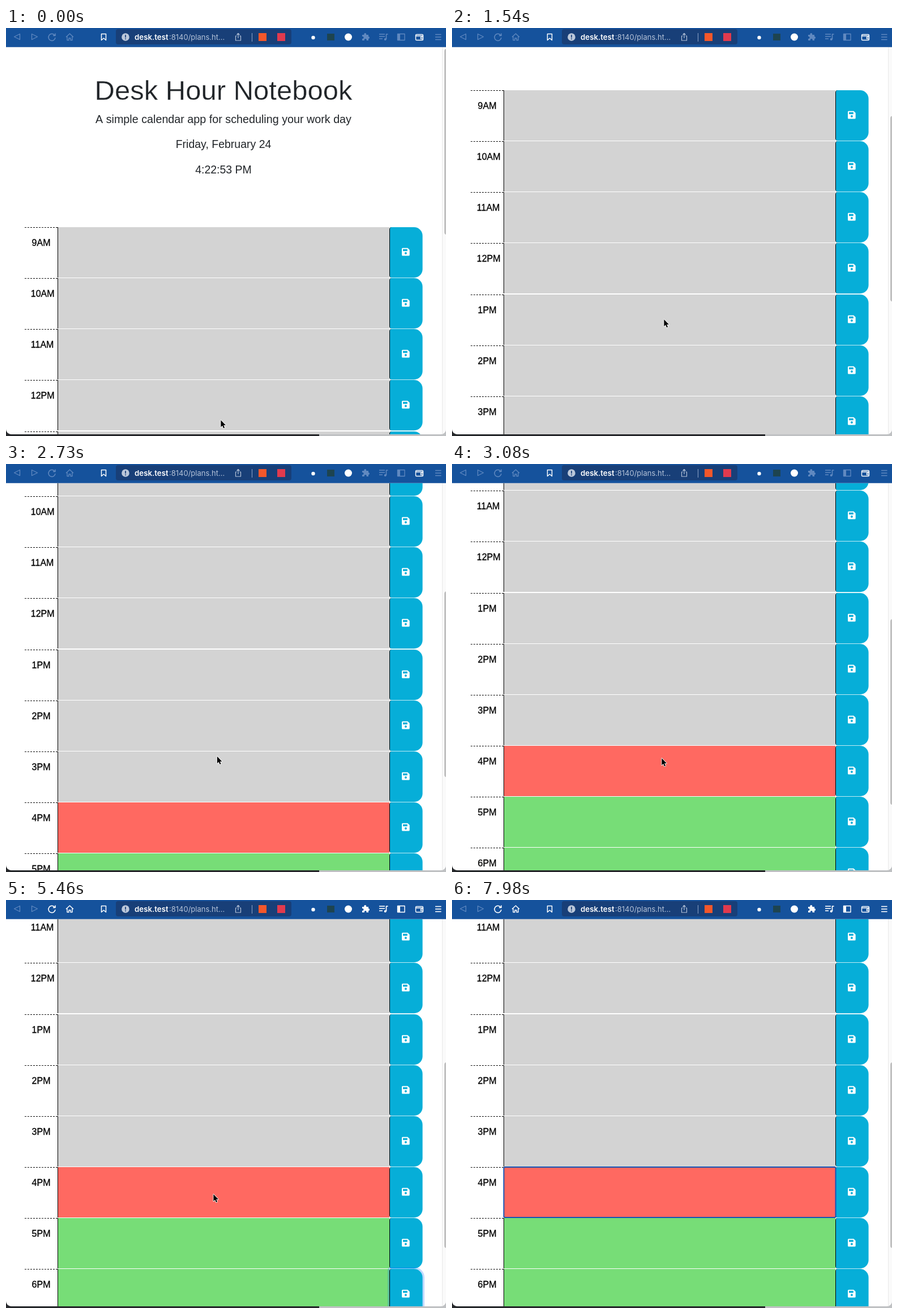
Write an HTML page with a canvas that moves like this. It is 777 px wide and 721 px high and loops after 8000 ms.

```html
<!DOCTYPE html>
<html lang="en">
<head>
<meta charset="utf-8">
<title>Desk Hour Notebook</title>
<style>
html, body { margin: 0; width: 100%; height: 100%; overflow: hidden; background: #fff; }
canvas { display: block; }
</style>
</head>
<body>
<canvas id="stage" width="777" height="721"></canvas>
<script>
const g = document.getElementById('stage').getContext('2d');
const LOOP = 8000, STEP = 70, PITCH = 90.15;
const SANS = '"Liberation Sans", Arial, sans-serif';
const UI = 'Inter, Roboto, sans-serif';
const BLUE = '#06aed8', FIELD = '#183f78';

const linear = p => p;
const easeIn = k => p => p ** k;
const easeOut = k => p => 1 - (1 - p) ** k;
const smooth = p => p * p * (3 - 2 * p);

// Trackpad flicks: the last one coasts to a stop.
const FLICKS = [
  { from: 630, to: 1050, y: 234, ease: easeIn(1.92) },
  { from: 1470, to: 1680, y: 65, ease: easeIn(1.92) },
  { from: 1750, to: 2030, y: 46, ease: easeOut(1.18) },
  { from: 2450, to: 2520, y: 4, ease: linear },
  { from: 2660, to: 3850, y: 162, ease: easeOut(4.2) }
];
const NUDGES = [
  { from: 0, to: 630, x: -5, y: -179, ease: smooth },
  { from: 1190, to: 1260, x: 0, y: 1, ease: linear },
  { from: 2170, to: 2310, x: -1, y: 1, ease: linear },
  { from: 2660, to: 3080, x: -3, y: 4, ease: linear },
  { from: 3080, to: 3360, x: -4, y: 0, ease: linear }
];

const ramp = (t, from, to) => Math.max(0, Math.min(1, (t - from) / (to - from)));
const travel = (moves, t, axis) =>
  moves.reduce((sum, m) => sum + m[axis] * m.ease(ramp(t, m.from, m.to)), 0);

function rect(x, y, w, h, color) {
  g.fillStyle = color;
  g.fillRect(x, y, w, h);
}

function round(x, y, w, h, r, color) {
  g.fillStyle = color;
  g.beginPath();
  g.roundRect(x, y, w, h, r);
  g.fill();
}

function dot(x, y, r, color) {
  g.fillStyle = color;
  g.beginPath();
  g.arc(x, y, r, 0, 7);
  g.fill();
}

function line(d, color, width = 1.3) {
  g.strokeStyle = color;
  g.lineWidth = width;
  g.stroke(new Path2D(d));
}

function shape(d, color) {
  g.fillStyle = color;
  g.fill(new Path2D(d));
}

function text(s, x, y, font, color, align = 'left') {
  g.font = font;
  g.textAlign = align;
  g.fillStyle = color;
  g.fillText(s, x, y);
}

// Changes the weight of the text just drawn: a white edge thins it.
function edge(s, x, y, color, width) {
  g.strokeStyle = color;
  g.lineWidth = width;
  g.strokeText(s, x, y);
}

function heading(s, y, size) {
  text(s, 384, y, `${size}px ${SANS}`, '#212529', 'center');
}

function saveIcon(x, y) {
  shape(`M${x + 1.5} ${y}h8.8l3.4 3.4v8.8a1.5 1.5 0 0 1-1.5 1.5h-10.7a1.5 1.5 0 0 1-1.5-1.5v-10.7a1.5 1.5 0 0 1 1.5-1.5z`, '#fff');
  rect(x + 2, y + 2, 7.8, 3.5, BLUE);
  dot(x + 6.9, y + 9.3, 2, BLUE);
}

function row(hour, y, glow, focus, caret) {
  const label = (hour > 12 ? hour - 12 : hour) + (hour < 12 ? 'AM' : 'PM');
  g.setLineDash([3, 2]);
  line(`M33 ${y + .5}H91`, '#000', 1);
  g.setLineDash([]);

  const x = label.length > 3 ? 43.8 : 45.6;
  text(label, x, y + 33, `16px ${SANS}`, '#000');
  edge(label, x, y + 33, '#000', .3);

  rect(91, y, 1, 89, '#000');
  rect(92, y, 585, 89, hour < 16 ? '#d3d3d3' : hour > 16 ? '#77dd77' : '#ff6961');

  if (glow) round(674, y - 3, 65, 95, [5, 18, 18, 5], `rgba(13,110,253,${.25 * glow})`);
  round(677, y, 20, 89, 4, '#000');
  round(678, y, 57.6, 89.2, [3, 15, 15, 3], BLUE);
  saveIcon(699, y + 36.7);

  if (focus) {
    g.globalAlpha = focus;
    g.strokeStyle = '#1453b5';
    g.lineWidth = 2;
    g.beginPath();
    g.roundRect(91.5, y, 586, 89, 2);
    g.stroke();
    g.globalAlpha = 1;
  }
  if (caret) rect(104, y + 13, 1, 17, '#000');
}

function page(t) {
  const scroll = Math.round(travel(FLICKS, t, 'y'));
  const focus = ramp(t, 6930, 7140);
  const glow = ramp(t, 3990, 4200) * (1 - focus);

  rect(0, 700, 777, 21, '#26282b');
  rect(553, 700, 224, 21, '#bfc1c3');
  g.save();
  g.beginPath();
  g.roundRect(0, 0, 777, 718, [0, 0, 9, 9]);
  g.clip();
  rect(0, 0, 777, 721, '#fff');

  const title = 'Desk Hour Notebook';
  heading(title, 127 - scroll, 49);
  edge(title, 384, 127 - scroll, '#fff', .35);
  heading('A simple calendar app for scheduling your work day', 168 - scroll, 19.74);
  heading('Friday, February 24', 212 - scroll, 19.5);
  heading(`4:22:${53 + Math.floor((t + 500) / 1000)} PM`, 257 - scroll, 19.5);

  for (let hour = 9; hour < 19; hour++) {
    const y = Math.round(352 - scroll + (hour - 9) * PITCH);
    const now = hour === 16;
    row(hour, y, hour === 18 && glow, now && focus, now && t >= 7000 && t < 7560);
  }

  rect(770, 34, 7, 687, '#fafafa');
  rect(770, 34, 1, 687, '#e8e8e8');
  round(774, 37 + scroll * .489, 8, 328, 4, '#c1c1c1');
  g.restore();
}

// Icons that dim while the window is inactive.
function controls(color) {
  line('M86 13A6 6 0 1 0 87 17M87 9.5V13.5H83', color, 1.5);
  line('M106 16L112.5 10L119 16M108 15V21.5H111V18H114V21.5H117V15', color);
  shape('M629 12H632.5A2 2 0 1 1 636 12H640V15A2 2 0 1 1 640 19V22H636.5A2 2 0 1 0 633 22H629V18.8A2 2 0 1 0 629 15Z', color);
  line('M659 11H669M659 15H669M659 19H665M671.5 20V11H674.5', color, 1.6);
  dot(669.7, 20, 2, color);
  line('M691.5 10.5H704V21.5H691.5Z', color);
  rect(692, 11, 4, 10, color);
  line('M758 11.5H768.5M758 16H768.5M758 20.5H768.5', color, 1.5);
}

function toolbar(t) {
  const dim = '#6089c0', soft = '#b5c3d9';
  rect(0, 0, 777, 33, '#15529c');
  rect(0, 33, 777, 1, '#4a78b2');
  round(194, 2, 310, 27, 4, FIELD);

  line('M24.5 10.5L14.5 15.5L24.5 20.5Z', dim);
  line('M45.5 10.5L55.5 15.5L45.5 20.5Z', dim);
  line('M168.5 10.5H176.5V21.5L172.5 18L168.5 21.5Z', '#fff', 1.5);

  dot(211, 16, 6.8, '#bcc8da');
  rect(210.2, 12, 1.7, 5, FIELD);
  rect(210.2, 18.3, 1.7, 1.8, FIELD);
  text('desk.test', 227, 20.5, `600 13.3px ${UI}`, '#fff');
  text(':8140/plans.ht...', 288, 20.5, `13px ${UI}`, soft);
  line('M407.5 14H405.5V22H414.5V14H412.5M410 18V9.5M407.5 12L410 9.5L412.5 12', soft, 1.2);
  rect(434, 9, 1, 15, '#8ea5c8');

  rect(446, 9, 14, 14, '#f4572b');
  rect(479, 9, 14, 14, '#e23a4e');
  dot(542.5, 17, 3.2, '#fff');
  rect(567, 10, 13, 12, '#1d4450');
  dot(604.5, 16, 6.5, '#fff');
  line('M725 11.5H735Q736.5 11.5 736.5 13V20Q736.5 21.5 735 21.5H725Q723.5 21.5 723.5 20V13Q723.5 11.5 725 11.5M724 14H736M737 16H732.5V19H737', '#fff', 1.4);

  controls(dim);
  g.globalAlpha = ramp(t, 3990, 4200);
  controls('#fff');
  g.globalAlpha = 1;
}

function pointer(t) {
  if (t >= 7980) return;
  g.save();
  g.translate(379 + travel(NUDGES, t, 'x'), 692 + travel(NUDGES, t, 'y'));
  if (t < 7000) {
    const arrow = 'M.4 1V13.3L3.2 10.8L5.1 15.2L7.1 14.3L5.2 10H9Z';
    line(arrow, '#fff', 1.6);
    shape(arrow, '#000');
  } else {
    const beam = 'M-3 -7Q.5 -7 .5 -4.5Q.5 -7 4 -7M-3 10Q.5 10 .5 7.5Q.5 10 4 10M.5 -5V8M-1.5 3.5H2.5';
    line(beam, '#fff', 3);
    line(beam, '#000', 1.1);
  }
  g.restore();
}

g.lineJoin = 'round';

function draw(now) {
  const t = Math.floor(now % LOOP / STEP) * STEP;
  page(t);
  toolbar(t);
  pointer(t);
  requestAnimationFrame(draw);
}
requestAnimationFrame(draw);
</script>
</body>
</html>
```
